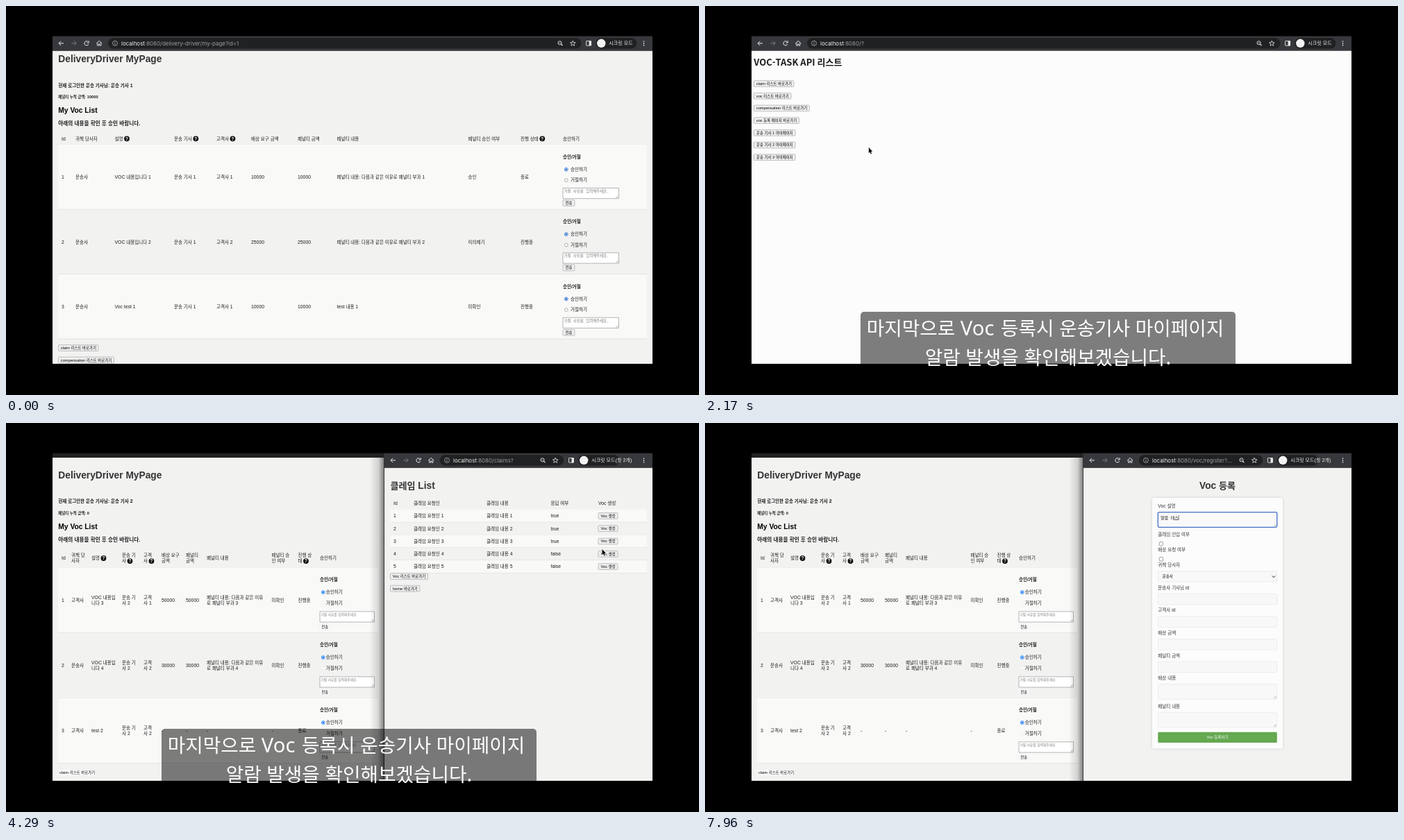
An HTML page with a canvas for the animation above (8 s loop, 998 by 561 pixels).

```html
<!DOCTYPE html>
<html lang="ko">
<head>
<meta charset="utf-8">
<title>VOC demo</title>
<style>
html, body { margin: 0; width: 100%; height: 100%; overflow: hidden; background: #000; }
canvas { display: block; width: 100vw; height: 100vh; }
</style>
</head>
<body>
<canvas id="stage"></canvas>
<script>
const W = 998, H = 561, LOOP = 8000;
const SANS = '"Liberation Sans", Arial, sans-serif';
const KR = '"Noto Sans CJK KR", "Noto Sans CJK", sans-serif';
const MONO = '"Liberation Mono", monospace';
const UI = 'Inter, sans-serif';
const BODY = 6.85, SMALL = 5.7;
const PAGE = '#f2f2f1', STRIPE = '#f9f9f8', INK = '#1c1c1c';

const canvas = document.getElementById('stage');
const ctx = canvas.getContext('2d');
const dpr = window.devicePixelRatio || 1;
canvas.width = W * dpr;
canvas.height = H * dpr;

// ---- drawing helpers ----
function rect(x, y, w, h, fill, r = 0, stroke, line = 0.6) {
  ctx.beginPath();
  ctx.roundRect(x, y, w, h, r);
  if (fill) { ctx.fillStyle = fill; ctx.fill(); }
  if (stroke) { ctx.strokeStyle = stroke; ctx.lineWidth = line; ctx.stroke(); }
}

function disc(x, y, r, fill, stroke, line = 0.7) {
  ctx.beginPath();
  ctx.arc(x, y, r, 0, Math.PI * 2);
  if (fill) { ctx.fillStyle = fill; ctx.fill(); }
  if (stroke) { ctx.strokeStyle = stroke; ctx.lineWidth = line; ctx.stroke(); }
}

function path(points, color, line = 1, close = false) {
  ctx.beginPath();
  points.forEach(([x, y], i) => i ? ctx.lineTo(x, y) : ctx.moveTo(x, y));
  if (close) ctx.closePath();
  ctx.strokeStyle = color;
  ctx.lineWidth = line;
  ctx.stroke();
}

// Hangul runs use the Korean face a little smaller; y is the middle of the line.
function text(str, x, y, { size = BODY, weight = 400, color = INK, font = SANS, center = false } = {}) {
  const runs = str.split(/([가-힣ㄱ-ㅎ]+)/).filter(Boolean).map(s => {
    const hangul = /[가-힣ㄱ-ㅎ]/.test(s);
    const face = hangul || font === KR ? `${weight} ${size * 0.95}px ${KR}` : `${weight} ${size}px ${font}`;
    ctx.font = face;
    return { s, face, w: ctx.measureText(s).width };
  });
  if (center) x -= runs.reduce((sum, r) => sum + r.w, 0) / 2;
  ctx.fillStyle = color;
  for (const r of runs) {
    ctx.font = r.face;
    ctx.fillText(r.s, x, y + size * 0.35);
    x += r.w;
  }
  return x;
}

const bold = (str, x, y, size, color) => text(str, x, y, { size, weight: 700, color });

function button(label, x, y, w, flat) {
  rect(x, y - 4.4, w, 8.8, flat ? '#fcfcfc' : '#efefef', 1.2, flat ? '#e6e6e6' : '#8a8a8a', 0.5);
  text(label, x + w / 2, y, { size: SMALL, center: true, color: '#000' });
}

function grip(x, y) {
  path([[x - 4, y - 1], [x - 1, y - 4]], '#777', 0.6);
  path([[x - 2, y - 1], [x - 1, y - 2]], '#777', 0.6);
}

function clip(x, y, w, h, draw) {
  ctx.save();
  ctx.beginPath();
  ctx.rect(x, y, w, h);
  ctx.clip();
  draw();
  ctx.restore();
}

// ---- browser toolbar ----
function toolbar(x, chip, address, mode) {
  const y = 53.8, white = '#e8eaed', dim = '#7b7d81';
  rect(x, 43.5, 931 - x, 21, '#37383b');
  rect(x + 80, 46, chip - 29 - x - 80, 15.6, '#202122', 7.8);
  rect(chip - 8, 46, 59, 15.6, '#202122', 7.8);

  const arrow = (ax, dir, c) => {
    path([[ax - 3.5 * dir, y], [ax + 3.5 * dir, y]], c);
    path([[ax - 0.3 * dir, y - 3.2], [ax - 3.5 * dir, y], [ax - 0.3 * dir, y + 3.2]], c);
  };
  arrow(x + 12.5, 1, white);
  arrow(x + 30.7, -1, dim);

  const rx = x + 49;
  ctx.beginPath();
  ctx.arc(rx, y, 3.1, 0.4, Math.PI * 1.75);
  ctx.strokeStyle = white;
  ctx.lineWidth = 1;
  ctx.stroke();
  path([[rx + 3.2, y - 3.6], [rx + 3.2, y - 0.8], [rx + 0.5, y - 0.8]], white);

  const hx = x + 67.2;
  path([[hx - 4, y + 0.2], [hx, y - 3.4], [hx + 4, y + 0.2]], white);
  path([[hx - 2.6, y - 0.6], [hx - 2.6, y + 3.3], [hx - 0.8, y + 3.3], [hx - 0.8, y + 1],
    [hx + 0.8, y + 1], [hx + 0.8, y + 3.3], [hx + 2.6, y + 3.3], [hx + 2.6, y - 0.6]], white, 0.9);

  disc(x + 90, y, 3.5, null, '#b5b7ba', 0.8);
  path([[x + 90, y - 0.5], [x + 90, y + 2]], '#b5b7ba', 0.9);
  path([[x + 90, y - 2], [x + 90, y - 1.2]], '#b5b7ba', 0.9);

  const end = text('localhost', x + 99, y, { size: 7.95, color: '#f1f1f1', font: UI });
  text(address, end, y, { size: 7.95, color: '#9c9ea2', font: UI });

  const zx = chip - 59.7;
  disc(zx, y - 0.6, 2.6, null, white, 0.9);
  path([[zx - 1.3, y - 0.6], [zx + 1.3, y - 0.6]], white, 0.7);
  path([[zx + 1.8, y + 1.2], [zx + 4, y + 3.4]], white, 1.1);

  const star = [...Array(10)].map((_, i) => {
    const a = -Math.PI / 2 + i * Math.PI / 5, r = i % 2 ? 1.7 : 4;
    return [chip - 41 + r * Math.cos(a), y + 0.2 + r * Math.sin(a)];
  });
  path(star, white, 0.8, true);

  rect(chip - 21.7, y - 3.3, 7, 6.6, null, 0.6, white, 0.9);
  rect(chip - 17.7, y - 3.3, 3.2, 6.6, white);
  disc(chip, y, 6.2, '#f3f3f3');
  text(mode, chip + 11, y, { size: 7.4, color: '#f1f1f1' });
  for (const d of [-2.8, 0, 2.8]) disc(918.5, y + d, 0.85, white);
}

// ---- driver page ----
// "|" marks where a cell wraps in the narrow window; a final "?" is a help badge.
const HEAD = ['Id', '귀책 당|사자', '설명 ?', '운송 기|사 ?', '고객|사 ?', '배상 요구 |금액', '페널티 |금액',
  '페널티 내용', '페널티 승|인 여부', '진행 상|태 ?', '승인하기'];
const WIDE = [80, 100, 156.5, 242, 303, 353, 420, 476.5, 665.5, 741, 802];
const NARROW = [80, 94, 123, 167, 198, 224, 259, 289, 382.5, 420.5, 452];

const voc = (id, owner, title, driver, client, sum, reason, agreed, state) =>
  [id, owner, title, `운송 기|사 ${driver}`, `고객|사 ${client}`, sum, sum, reason, agreed, state];
const penalty = n => `페널티 내용: 다음과 같은 이유|로 페널티 부과 ${n}`;
const DRIVERS = {
  1: { total: '10000', rows: [
    voc('1', '운송사', 'VOC 내용입|니다 1', 1, 1, '10000', penalty(1), '승인', '종료'),
    voc('2', '운송사', 'VOC 내용입|니다 2', 1, 2, '25000', penalty(2), '이의제기', '진행중'),
    voc('3', '운송사', 'Voc test 1', 1, 1, '10000', 'test 내용 1', '미확인', '진행중')] },
  2: { total: '0', rows: [
    voc('1', '고객사', 'VOC 내용입|니다 3', 2, 1, '50000', penalty(3), '미확인', '진행중'),
    voc('2', '운송사', 'VOC 내용입|니다 4', 2, 2, '30000', penalty(4), '미확인', '진행중'),
    voc('3', '고객사', 'test 2', 2, 2, '-', '-', '-', '종료')] },
};

function cell(str, x, y, narrow, weight) {
  const help = str.endsWith('?');
  if (help) str = str.slice(0, -1);
  const lines = narrow ? str.split('|') : [str.replace('|', '')];
  let end, ly;
  lines.forEach((s, i) => {
    ly = y + (i - (lines.length - 1) / 2) * 8.2;
    end = text(s, x, ly, { weight });
  });
  if (help) {
    disc(end + 3.6, ly, 3.9, '#111');
    text('?', end + 3.6, ly, { size: 6.4, weight: 700, color: '#fff', center: true });
  }
}

function approval(x, top, narrow) {
  const blue = narrow ? '#1a7cf5' : '#2f74d0';
  bold('승인/거절', x, top + 17.5, BODY);
  disc(x + 4.8, top + 35.6, 2.5, '#fff', blue, 0.8);
  disc(x + 4.8, top + 35.6, 1.5, blue);
  text('승인하기', x + (narrow ? 8.7 : 11), top + 35.3);
  disc(x + 4.8, top + 51.2, 2.4, '#fff', narrow ? '#e2e2e2' : '#808080', 0.6);
  text('거절하기', x + (narrow ? 8.7 : 11), top + 51);
  const w = narrow ? 78.5 : 80.5, ty = top + (narrow ? 63.4 : 62.4);
  rect(x, ty, w, 15.2, '#fff', 0, '#858585');
  text('거절 사유를 입력해주세요.', x + 1.5, ty + 4.6, { size: SMALL * (narrow ? 0.88 : 1), color: '#7d7d7d', font: narrow ? SANS : MONO });
  grip(x + w, ty + 15.2);
  button('전송', x, top + (narrow ? 85.3 : 84), narrow ? 14.5 : 17, narrow);
}

function driverPage(id, dy, narrow) {
  const { total, rows } = DRIVERS[id];
  const cols = narrow ? NARROW : WIDE;
  const right = narrow ? 536 : 923, rowH = narrow ? 94 : 93.4;
  const top = narrow ? 208.5 : 213.8 + dy;
  bold('DeliveryDriver MyPage', 75.3, 90 + dy, 13.75, '#333');
  bold(`현재 로그인한 운송 기사님: 운송 기사 ${id}`, 75.3, 128 + dy, BODY);
  bold(`페널티 누적 금액: ${total}`, 75.3, 145 + dy, SMALL);
  bold('My Voc List', 75.3, 164.3 + dy, 10.27, '#000');
  bold('아래의 내용을 확인 후 승인 바랍니다.', 75.3, 183.3 + dy, 8);
  HEAD.forEach((s, i) => cell(s, cols[i], narrow ? 195 : 205 + dy, narrow, 500));
  rect(75.3, top - 0.3, right - 75.3, 0.5, '#e0e0e0');
  rows.forEach((row, i) => {
    const y = top + i * rowH;
    if (i % 2 === 0) rect(75.3, y, right - 75.3, rowH, STRIPE);
    rect(75.3, y + rowH - 0.5, right - 75.3, 0.6, '#d8d8d8');
    row.forEach((s, c) => cell(s, cols[c], y + rowH / 2, narrow));
    approval(cols[10], y, narrow);
  });
  const end = top + rowH * 3 + (narrow ? 13.5 : 12.8);
  button('claim 리스트 바로가기', 75.5, end, narrow ? 54 : 57.5, narrow);
  button('compensation 리스트 바로가기', 75.5, end + 17.5, 80, narrow);
}

// ---- other pages ----
function homePage() {
  rect(67, 64.5, 864, 451.5, '#fcfcfc');
  text('VOC-TASK API 리스트', 70.3, 81, { size: 13.68, weight: 700, font: KR });
  [['claim 리스트 바로가기', 57.5], ['voc 리스트 바로가기', 53.5], ['compensation 리스트 바로가기', 80],
    ['voc 등록 페이지 바로가기', 65], ['운송 기사 1 마이페이지', 59.5], ['운송 기사 2 마이페이지', 59.5],
    ['운송 기사 3 마이페이지', 59.5]].forEach(([s, w], i) => button(s, 70.5, 112 + i * 17.7, w));
}

function claimsPage() {
  const cols = [558, 587, 692, 784.5, 853];
  bold('클레임 List', 553.5, 90, 13.75, '#333');
  ['Id', '클레임 요청인', '클레임 내용', '응답 여부', 'Voc 생성'].forEach((s, i) => text(s, cols[i], 116, { weight: 500 }));
  for (let n = 1; n <= 5; n++) {
    const y = 115.6 + n * 18.3;
    if (n % 2) rect(553.5, y - 9.1, 369.5, 18.3, STRIPE);
    rect(553.5, y + 8.8, 369.5, 0.5, '#dcdcdc');
    [`${n}`, `클레임 요청인 ${n}`, `클레임 내용 ${n}`, n < 4 ? 'true' : 'false'].forEach((s, i) => text(s, cols[i], y));
    button('Voc 생성', 853, y, 28);
  }
  button('Voc 리스트 바로가기', 553.5, 221.2, 54);
  button('home 바로가기', 553.5, 238.7, 42.5);
}

// Keystrokes as the input method composes them.
const KEYS = ['', 'ㅇ', '아', '알', '알ㄹ', '알라', '알람', '알람 ', '알람 ㅌ', '알람 테', '알람 텟', '알람 테스'];
const TYPE_START = 6720, KEY_MS = 105;

function registerPage(time) {
  const x = 652.3, w = 171.5, focus = time >= 5300;
  bold('Voc 등록', 712, 90, 13.75, '#333');
  ctx.save();
  ctx.shadowColor = 'rgba(0,0,0,.13)';
  ctx.shadowBlur = 4 * dpr;
  rect(644, 108, 188, 361.5, '#fcfcfc', 2.5);
  ctx.restore();

  [['Voc 설명', 119.8], ['클레임 인입 여부', 160.3], ['배상 요청 여부', 182.5], ['귀책 당사자', 204.5],
    ['운송사 기사님 id', 237.6], ['고객사 id', 270], ['배상 금액', 302.6], ['페널티 금액', 335.2],
    ['배상 내용', 367.6], ['페널티 내용', 408.5]].forEach(([s, y]) => text(s, x, y, { color: '#333' }));

  const field = (y, h) => rect(x, y, w, h, '#f8f8f8', 1.5, '#e2e2e2', 0.6);
  if (focus) rect(x, 128.7, w, 21.7, '#f9f9fa', 1.8, '#4270c4', 1.3);
  else field(128.7, 21.7);
  grip(x + w - 0.5, 150);
  for (const y of [174.2, 196.3]) rect(654.3, y - 2.7, 5.2, 5.4, '#fff', 1, '#777', 0.7);
  field(213.7, 15.4);
  text('운송사', 658.7, 221.5, { size: SMALL, color: '#000', weight: 500 });
  path([[816.6, 220.3], [819, 222.8], [821.4, 220.3]], '#222', 1);
  for (let i = 0; i < 4; i++) field(246.4 + i * 32.55, 15.4);
  for (const y of [376.7, 417.3]) { field(y, 21.7); grip(x + w - 0.5, y + 21.4); }
  rect(x, 445.7, w, 15.4, '#65a951', 1.5);
  text('Voc 등록하기', 738, 453.4, { size: SMALL, color: '#fff', center: true });

  const step = Math.max(0, Math.min(KEYS.length - 1, Math.floor((time - TYPE_START) / KEY_MS)));
  const typed = KEYS[step];
  const style = { size: 6.2, font: MONO, color: '#111' };
  const last = typed.slice(-1);
  const start = text(typed.slice(0, -1), 656.3, 136.5, style);
  const end = text(last, start, 136.5, style);
  if (last.trim()) rect(start, 139.4, end - start, 0.6, '#222');
  const blink = step > 0 || time % 1000 < 500;
  if (focus && blink) rect(end + 0.1, 133, 0.6, 7, '#111');
}

function splitView(time) {
  rect(67, 43.5, 478, 6.5, '#232222');
  clip(67, 50, 477.5, 466, () => {
    rect(67, 50, 478, 466, PAGE);
    driverPage(2, -15.2, true);
    const shade = ctx.createLinearGradient(524, 0, 545, 0);
    shade.addColorStop(0, 'rgba(0,0,0,0)');
    shade.addColorStop(0.6, 'rgba(0,0,0,.14)');
    shade.addColorStop(1, 'rgba(0,0,0,.5)');
    rect(524, 50, 21, 466, shade);
  });
  const claims = time < REGISTER;
  clip(545, 43, 386, 473, () => {
    rect(545, 64.5, 386, 452, PAGE);
    if (claims) claimsPage(); else registerPage(time);
  });
  rect(544, 43.5, 0.9, 472.5, '#333');
  toolbar(545, 832.2, claims ? ':8080/claims?' : ':8080/voc/register?...', '시크릿 모드(창 2개)');
}

function fullView(address, draw) {
  clip(67, 43, 864, 473, () => {
    rect(67, 64.5, 864, 452, PAGE);
    draw();
  });
  toolbar(67, 857.3, address, '시크릿 모드');
}

// ---- overlay and pointer ----
function caption() {
  const style = { size: 29.2, weight: 500, color: '#fff', font: '"Noto Sans", sans-serif', center: true };
  rect(224, 441, 540, 80, 'rgba(0,0,0,.5)', [5, 5, 0, 0]);
  ctx.wordSpacing = '2px';
  text('마지막으로 Voc 등록시 운송기사 마이페이지', 490, 465, style);
  text('알람 발생을 확인해보겠습니다.', 494, 507, style);
  ctx.wordSpacing = '0px';
}

// time, x, y of each pointer stop
const STOPS = [[1850, 290, 232], [2170, 235.8, 204], [2560, 120.3, 197], [3650, 120.3, 197],
  [4240, 858.5, 182], [4800, 858.5, 182], [5250, 735, 139], [5400, 735, 139]];

function pointer(time) {
  const i = STOPS.findIndex(([t], n) => n && time < t);
  if (i < 1 || time < STOPS[0][0]) return;
  const [t0, x0, y0] = STOPS[i - 1], [t1, x1, y1] = STOPS[i];
  const k = (time - t0) / (t1 - t0), e = k * k * (3 - 2 * k);
  ctx.save();
  ctx.translate(x0 + (x1 - x0) * e, y0 + (y1 - y0) * e);
  const tip = [[0, 0], [0, 8.2], [1.8, 6.5], [3, 9.4], [4.3, 8.8], [3.1, 6], [5.4, 5.8]];
  path(tip, '#fff', 1.2, true);
  ctx.fillStyle = '#000';
  ctx.fill();
  ctx.restore();
}

// ---- timeline ----
const HOME = 380, MYPAGE = 2660, SPLIT = 3620, REGISTER = 4760;
const CAPTION = [1800, 6950];

function draw(time) {
  ctx.setTransform(canvas.width / W, 0, 0, canvas.height / H, 0, 0);
  rect(0, 0, W, H, '#000');
  if (time < HOME) fullView(':8080/delivery-driver/my-page?id=1', () => driverPage(1, -13.7, false));
  else if (time < MYPAGE) fullView(':8080/?', homePage);
  else if (time < SPLIT) fullView(':8080/delivery-driver/my-page?id=2', () => driverPage(2, 0, false));
  else splitView(time);
  pointer(time);
  if (time >= CAPTION[0] && time < CAPTION[1]) caption();
}

const origin = performance.now();
function tick() {
  draw((performance.now() - origin) % LOOP);
  requestAnimationFrame(tick);
}
tick();
</script>
</body>
</html>
```
